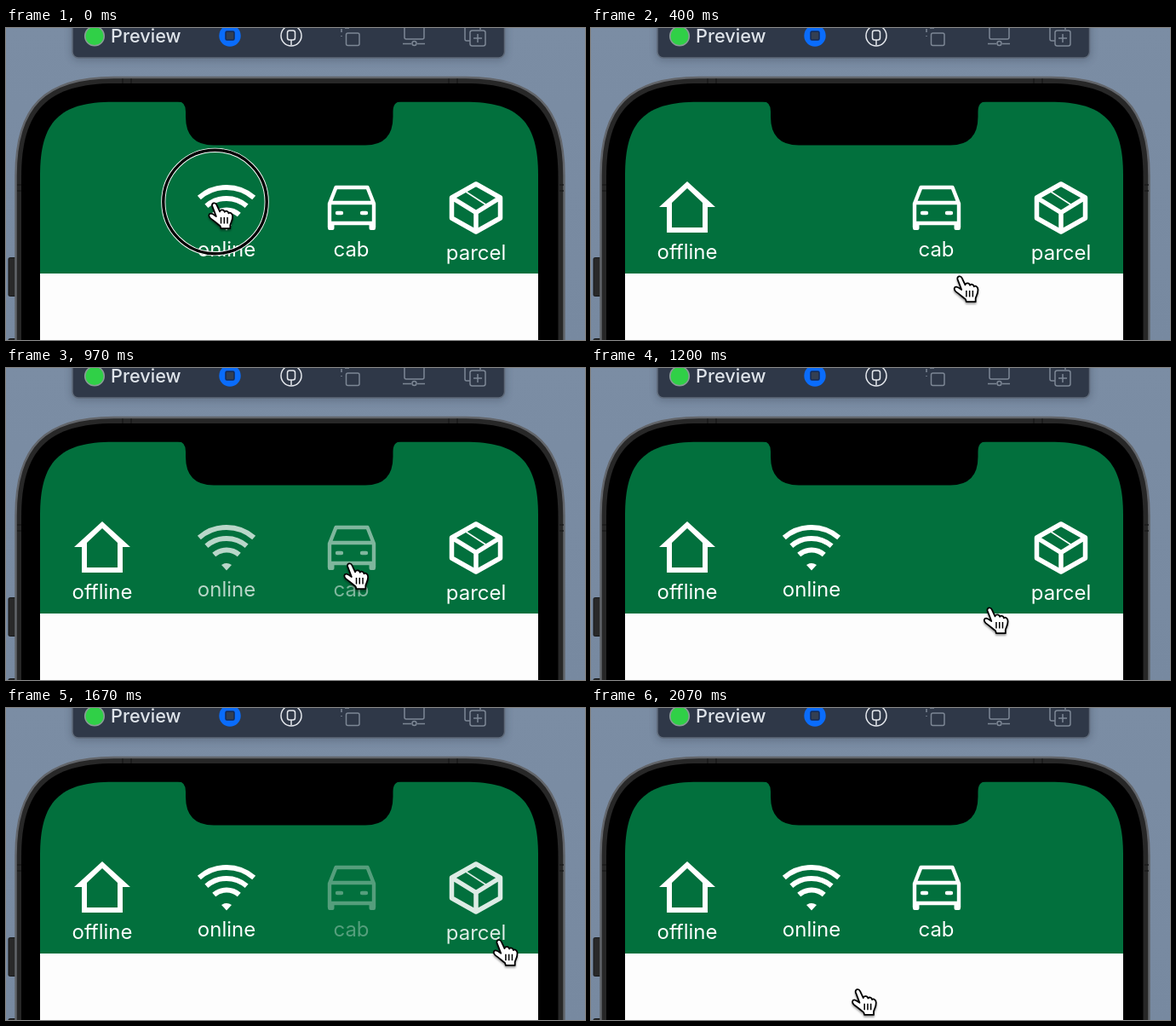
These frames come from a looping animation (680 px wide and 366 px high, 2.11 s). An HTML page:

```html
<!DOCTYPE html>
<html lang="en">
<head>
<meta charset="utf-8">
<title>Tab picker</title>
<style>
  html, body { margin: 0; width: 100%; height: 100%; overflow: hidden; background: #798ba2; }
  svg { display: block; width: 680px; height: 366px; }
  text { font-family: Inter, "Liberation Sans", sans-serif; }
  .tab { fill: none; stroke: #fff; }
  .tab text, .solid { fill: #fff; stroke: none; }
  .tab text { font-size: 24px; text-anchor: middle; }
  .tool { fill: none; stroke: #7d8795; stroke-width: 1.5; }
</style>
</head>
<body>
<svg viewBox="0 0 680 366">
  <defs>
    <linearGradient id="backdrop" x2="0" y2="1">
      <stop stop-color="#7b8da4"/><stop offset="1" stop-color="#7789a0"/>
    </linearGradient>
    <filter id="soft" x="-20%" y="-60%" width="140%" height="220%"><feGaussianBlur stdDeviation="4"/></filter>
    <filter id="handShadow" x="-40%" y="-40%" width="180%" height="180%">
      <feDropShadow dx="0" dy="2" stdDeviation="1.3" flood-opacity=".4"/>
    </filter>
  </defs>
  <rect width="680" height="366" fill="url(#backdrop)"/>

  <!-- toolbar -->
  <rect x="76" y="-16" width="512" height="55" rx="9" fill="#1d2738" opacity=".22" filter="url(#soft)"/>
  <rect x="78" y="-20" width="507.500" height="55" rx="7" fill="#2f3848" stroke="#5f6a7a" stroke-width="1.500"/>
  <circle cx="104" cy="9.500" r="11.300" fill="#30d047" stroke="#8a9a98" stroke-width="1.500"/>
  <text x="123" y="17" font-size="21.700" font-weight="500" fill="#dfe4ea">Preview</text>
  <circle cx="263" cy="9" r="12.700" fill="#0a6cfb"/>
  <rect x="258" y="4" width="10" height="10" rx="1.500" fill="#343f52" stroke="#142a55" stroke-width="1.500"/>
  <g class="tool" style="stroke:#e6e9ee">
    <circle cx="335" cy="9" r="12"/>
    <rect x="330.500" y="3" width="9" height="11" rx="2.500"/>
    <path d="M335 14V20"/>
  </g>
  <g class="tool">
    <rect x="399.500" y="6" width="15.500" height="14.500" rx="2"/>
    <path d="M394 5V1M398 0H403M394 9V10"/>
    <path d="M468 -3V11Q468 13 470 13H489Q491 13 491 11V-3M466 18.500H476M483 18.500H492"/>
    <circle cx="479.500" cy="18" r="2.500"/>
    <path d="M545 15H541Q539 15 539 13V-3M557 2V-3"/>
    <rect x="545" y="3" width="18" height="18" rx="2.500"/>
    <path d="M554 7V17M549 12H559"/>
  </g>

  <!-- phone -->
  <g fill="#292929" stroke="#171717">
    <rect x="3" y="269.500" width="12" height="45" rx="1.500"/>
    <rect x="3" y="364.500" width="12" height="45" rx="1.500"/>
  </g>
  <path id="frame" fill="#272727" stroke="#62656a" stroke-width="2.500"/>
  <path d="M137 59.500V66M147 59.500V66M520 59.500V66M530 59.500V66M13 184H18M13 191H18M650 184H655M650 191H655" stroke="#1a1a1a" stroke-width="1.500"/>
  <path id="bezel"/>
  <path id="screen" fill="#02703d"/>
  <rect x="40" y="288" width="585" height="80" fill="#fdfdfd"/>
  <path d="M202 86Q211 86.500 211 98V104Q211 137.500 244 137.500H422Q454.500 137.500 454.500 104V98Q454.500 86.500 464 86Z"/>

  <!-- tabs -->
  <g class="tab">
    <path class="solid" fill-rule="evenodd" d="M113 180L146 210H137V240H89V210H80ZM113 188L95 205V234H131V205Z"/>
    <text x="113" y="271">offline</text>
  </g>
  <g class="tab" stroke-width="6">
    <path id="waves"/>
    <path class="solid" d="M259 237.500L253 231Q259 227 265 231Z"/>
    <text x="259" y="268">online</text>
  </g>
  <g class="tab" stroke-width="4.400" stroke-linejoin="round">
    <path d="M380 234V206L387.500 187H424.500L432 206V234M380 205H432M380 229H432"/>
    <path class="solid" d="M378 228H385.500V235Q385.500 237 383.500 237H380Q378 237 378 235ZM426.500 228H434V235Q434 237 432 237H428.500Q426.500 237 426.500 235Z"/>
    <path d="M389 217H394M418 217H423" stroke-linecap="round"/>
    <text x="405.500" y="267.500">cab</text>
  </g>
  <g class="tab" stroke-width="5.500" stroke-linejoin="round">
    <path d="M552 183L580.500 199V223L552 239L523.500 223V199ZM523.500 199L552 216.500L580.500 199M552 216.500V239"/>
    <path d="M540 192L564 207.500" stroke-width="1.500"/>
    <text x="552" y="272">parcel</text>
  </g>

  <!-- pointer -->
  <g id="pointer">
    <g id="ring" fill="none" transform="translate(.5 -2)">
      <circle r="60.700" stroke="#fff" stroke-width="5.200"/>
      <circle r="60.700" stroke="#000" stroke-width="3.400"/>
    </g>
    <g filter="url(#handShadow)" stroke="#000" stroke-width="1.900" stroke-linejoin="round" transform="scale(.94)">
      <path fill="#fff" d="M-3 3C-4 -1 1 -2 2.500 1.500L6.500 10C7 7 12 7 12.500 10.500C13.500 8.500 17 9 17.500 12C19 10.500 22.500 12 22.500 16C22.500 22 20 24 19.500 27L19.500 31H8L7 28C3 25 0 22 -5 18.500C-8.500 15.500 -7 12 -4 12.500C-2 13 0 14.500 2 16Z"/>
      <path fill="none" d="M8 17V25M12 17V25M16 17V25" stroke-width="1.600"/>
    </g>
  </g>
</svg>
<script>
const LOOP = 2110, FADE = 330, FADE_OUT_DELAY = 50;
const $ = id => document.getElementById(id);
const tabs = document.querySelectorAll('.tab');

// Each tap selects a tab: it fades out and the previous selection returns.
const taps = [
  { press: -100, release: 30, change: 10 },
  { press: 655, release: 760, change: 755 },
  { press: 1420, release: 1545, change: 1545 }
];

// time, x, y of the fingertip
const route = [
  [0, 245, 206], [60, 245, 206], [230, 350, 283], [400, 433, 292],
  [480, 436, 282], [600, 404, 230], [1020, 404, 230], [1200, 468, 282],
  [1400, 566.5, 230], [1570, 566.5, 230], [1710, 584, 292], [1830, 583, 326],
  [1960, 475, 348], [2070, 315, 331], [2110, 275, 316]
];

// Open-bottomed panel with continuous corners; pull is the handles' distance from the corner.
function panel(left, top, right, reach, pull) {
  return `M${left} 400V${top + reach}`
    + `C${left} ${top + pull} ${left + pull} ${top} ${left + reach} ${top}H${right - reach}`
    + `C${right - pull} ${top} ${right} ${top + pull} ${right} ${top + reach}V400Z`;
}
$('frame').setAttribute('d', panel(11.5, 58, 655.5, 115, 34));
$('bezel').setAttribute('d', panel(18, 65, 648.5, 110, 31));
$('screen').setAttribute('d', panel(40, 86.7, 625, 86, 23));

function arc(r) {
  const a = 41 * Math.PI / 180, dx = r * Math.sin(a), y = 236 - r * Math.cos(a);
  return `M${259 - dx} ${y}A${r} ${r} 0 0 1 ${259 + dx} ${y}`;
}
$('waves').setAttribute('d', [49, 36, 22.5].map(arc).join(''));

function ease(u) {
  u = Math.min(1, Math.max(0, u));
  return u * u * (3 - 2 * u);
}

function slope(i, axis) {
  const a = route[i - 1], b = route[i], c = route[i + 1];
  if (!a || !c || a[axis] === b[axis] || b[axis] === c[axis]) return 0;
  return (c[axis] - a[axis]) / (c[0] - a[0]);
}

function along(t, axis) {
  let i = 0;
  while (i < route.length - 2 && t >= route[i + 1][0]) i++;
  const a = route[i], b = route[i + 1], span = b[0] - a[0];
  const u = (t - a[0]) / span, s = ease(u);
  return a[axis] * (1 - s) + b[axis] * s
    + span * u * (1 - u) * ((1 - u) * slope(i, axis) - u * slope(i + 1, axis));
}

function opacity(i, t) {
  const shown = i < taps.length ? ease((t - taps[i].change) / FADE) : 0;
  const hidden = i > 0 ? ease((t - taps[i - 1].change - FADE_OUT_DELAY) / FADE) : 1;
  return Math.max(shown, 1 - hidden);
}

function draw(t) {
  tabs.forEach((tab, i) => tab.setAttribute('opacity', opacity(i, t)));
  $('pointer').setAttribute('transform', `translate(${along(t, 1)} ${along(t, 2)})`);
  const pressed = taps.some(tap => t >= tap.press && t < tap.release);
  $('ring').setAttribute('visibility', pressed ? 'visible' : 'hidden');
}

const start = performance.now();
function tick() {
  draw((performance.now() - start) % LOOP);
  requestAnimationFrame(tick);
}
draw(0);
requestAnimationFrame(tick);
</script>
</body>
</html>
```
